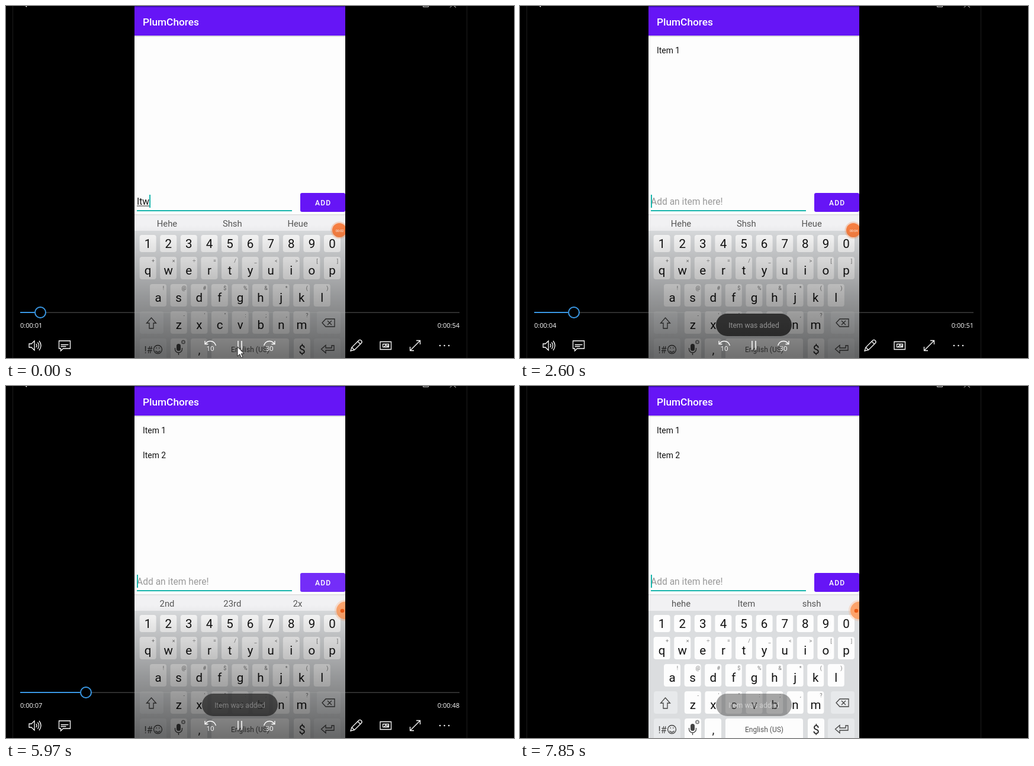
An HTML page with a canvas for the animation above (7.99 s loop, 858 by 595 pixels).

```html
<!DOCTYPE html>
<html lang="en">
<head>
<meta charset="utf-8">
<title>To-do demo</title>
<style>
html, body { margin: 0; height: 100%; overflow: hidden; background: #000; }
canvas { display: block; }
</style>
</head>
<body>
<canvas id="stage" width="858" height="595"></canvas>
<script>
const ctx = document.getElementById('stage').getContext('2d');
const LOOP = 7990, PITCH = 34.6;
const UI = 'Roboto, sans-serif', PLAYER = '"Open Sans", sans-serif';

// Steps: [start ms, value]
const typed = [[0, 'Itw'], [300, 'It'], [550, 'Ite'], [750, 'Item'], [1000, 'Item '], [1300, 'Item 1'], [1600, ''],
  [3550, 'I'], [3900, 'It'], [4150, 'Ite'], [4400, 'Item'], [4700, 'Item '], [4930, 'Item 2'], [5850, '']];
const hints = [[0, 'Hehe Shsh Heue'], [1050, 'U O K'], [1400, '1b 10r 11th'], [2150, 'Hehe Shsh Heue'],
  [4750, 'U O K'], [5200, '2nd 23rd 2x'], [6200, 'hehe Item shsh']];
const slider = [[0, 58], [1520, 76], [3680, 106], [5040, 124], [5970, 135], [6660, 143], [7990, 161]];

const at = (steps, t) => steps.filter(s => s[0] <= t).pop()[1];
const ramp = (t, a, b) => Math.min(1, Math.max(0, (t - a) / (b - a)));
function along(points, t) {
  const i = points.findIndex(p => p[0] > t), [a, x] = points[i - 1], [b, y] = points[i];
  return x + (y - x) * ramp(t, a, b);
}

function rect(x, y, w, h, color, r = 0) {
  ctx.fillStyle = color;
  ctx.beginPath();
  ctx.roundRect(x, y, w, h, r);
  ctx.fill();
}
function disc(x, y, r, color) {
  ctx.fillStyle = color;
  ctx.beginPath();
  ctx.arc(x, y, r, 0, 7);
  ctx.fill();
}
function text(s, x, y, size, color, align = 'center', weight = 400, family = UI) {
  ctx.font = `${weight} ${size}px ${family}`;
  ctx.textAlign = align;
  ctx.fillStyle = color;
  ctx.fillText(s, x, y);
}
function line(path, color, width = 1.3) {
  ctx.strokeStyle = color;
  ctx.lineWidth = width;
  ctx.stroke(new Path2D(path));
}
function faded(alpha, draw) {
  if (alpha <= 0) return;
  ctx.save();
  ctx.globalAlpha = alpha;
  draw();
  ctx.restore();
}

function keyRow(chars, x, y, h, base, symbols = '') {
  [...chars].forEach((c, i) => {
    const cx = x + PITCH * i;
    rect(cx - 14, y, 28, h, '#fdfdfd', 4);
    text(c, cx, base, 20.5, '#111');
    if (symbols) text(symbols[i], cx + 9, y + 10, 9, '#777');
  });
}

function keyboard() {
  rect(217, 380, 356, 215, '#dbdddf');
  keyRow('1234567890', 239.6, 387, 29, 409);
  keyRow('qwertyuiop', 239.6, 424, 38, 454, '+×÷=/_<>[]');
  keyRow('asdfghjkl', 257, 470, 38, 499.5, '!@#$%&*()');
  keyRow('zxcvbnm', 291.8, 516, 38, 545.5, '-\'":;,?');
  const fn = '#e7e9eb', ink = '#444';
  rect(226, 516, 40, 38, fn, 4);
  rect(525, 516, 40, 38, fn, 4);
  rect(226, 562, 45, 38, fn, 4);
  rect(520, 562, 45, 38, fn, 4);
  rect(278, 562, 28, 38, '#fdfdfd', 4);
  rect(312, 562, 28, 38, '#fdfdfd', 4);
  rect(347, 562, 131, 38, '#fdfdfd', 4);
  rect(486, 562, 28, 38, '#fdfdfd', 4);
  line('M245.5 527l8 9h-4.5v9h-7v-9h-4.500z', ink);
  line('M534 535.500l6-6.500h15v13h-15zM543 532l7 7m0-7l-7 7', ink);
  text('!#', 240.5, 587, 16, ink);
  line('M263.500 580.500a7 7 0 1 1-14 0a7 7 0 1 1 14 0M252.500 583q4 4.500 8 0M253.500 578h1.500m3 0h1.500', ink);
  rect(288, 571, 7, 12, ink, 3.5);
  line('M285.500 578v2a6 6 0 0 0 12 0v-2M291.500 586v4', ink);
  line('M302 568a2.500 2.500 0 1 1-5 0a2.500 2.500 0 1 1 5 0', '#888', 2);
  text(',', 326.5, 588, 20, '#222');
  text('English (US)', 412.5, 585, 12, '#555');
  text('$', 500, 588, 20, '#222');
  line('M554 574v8h-14v4.500l-7.500-6.500l7.500-6.500v4.500h10v-4z', ink);
}

function inputField(t) {
  const s = at(typed, t);
  text(s || 'Add an item here!', 221, 336, 15.6, s ? '#111' : '#999', 'left');
  const end = 221 + ctx.measureText(s).width;
  const start = 221 + ctx.measureText(s.slice(0, s.indexOf(' ') + 1)).width;
  if (s) rect(start, 337.5, end - start, 1, '#222');
  rect(221, 345, 262, 2, '#18b5ac');
  rect(s ? end : 221, 319, 2, 22, '#18b5ac');
  const pressed = [1600, 5850].some(p => t > p - 60 && t < p + 250);
  rect(497, 316, 76, 32, pressed ? '#742df8' : '#6615f6', 3);
  ctx.letterSpacing = '1.1px';
  text('ADD', 522, 337, 12.1, '#fff', 'left', 500);
  ctx.letterSpacing = '0px';
}

function recorder(t) {
  if (t < 4400) {
    disc(563, 379, 14.5, 'rgba(240,150,100,.35)');
    disc(563, 379, 12, '#f77f42');
    text('00:0' + Math.floor(2 + t / 1000), 563.5, 381.5, 5.5, '#fff');
  } else {
    disc(573, 379.5, 18, 'rgba(250,170,120,.3)');
    disc(573, 379.5, 15, '#fca36b');
    disc(568, 380, 3.3, '#ed5a14');
  }
}

function toast(t, start, out, end) {
  faded(ramp(t, start, start + 150) * (1 - ramp(t, out, end)), () => {
    rect(331, 520, 128, 38, '#505050', 19);
    text('Item was added', 395, 544, 12.1, '#fff');
  });
}

function phone(t) {
  ctx.save();
  ctx.beginPath();
  ctx.rect(217, 0, 356, 595);
  ctx.clip();
  rect(217, 0, 356, 595, '#fdfdfd');
  rect(217, 50, 356, 2, '#d8d8dc');
  rect(217, 0, 356, 50, '#6615f6');
  rect(217, 0, 356, 2, '#3f0bb4');
  text('PlumChores', 231, 32.5, 17.3, '#fff', 'left', 500);
  if (t >= 1600) text('Item 1', 231, 80, 13.9, '#111', 'left');
  if (t >= 5850) text('Item 2', 231, 121.5, 13.9, '#111', 'left');
  inputField(t);
  rect(217, 352, 356, 28, '#f1f1f3');
  rect(217, 352, 356, 1.5, '#dcdcde');
  at(hints, t).split(' ').forEach((w, i) => text(w, 272 + 110.3 * i, 372.5, 14.8, '#555'));
  keyboard();
  recorder(t);
  toast(t, 1650, 3200, 3600);
  toast(t, 5850, 7580, 8130);
  ctx.restore();
}

function skip(x, dir, label) {
  ctx.save();
  ctx.translate(x, 0);
  ctx.scale(dir, 1);
  line('M-9 566v5.500h5.500M-9 571.500Q-5 566.500 0 566.500Q7 566.500 9.500 574', '#fff');
  ctx.restore();
  text(label, x, 582.5, 11.5, '#fff', 'center', 400, PLAYER);
}

function controls(t) {
  const shade = ctx.createLinearGradient(0, 370, 0, 595);
  shade.addColorStop(0, 'rgba(0,0,0,0)');
  shade.addColorStop(.53, 'rgba(0,0,0,.31)');
  shade.addColorStop(1, 'rgba(0,0,0,.56)');
  rect(217, 370, 356, 225, shade);

  const x = along(slider, t);
  rect(x + 10, 517.5, 756 - x, 1.3, 'rgba(160,160,160,.45)');
  rect(24, 517, x - 34, 2, '#3a98e4');
  ctx.strokeStyle = '#3a98e4';
  ctx.lineWidth = 2;
  ctx.beginPath();
  ctx.arc(x, 518, 9, 0, 7);
  ctx.stroke();
  const sec = Math.floor((x - 24) / 13.4 - .7);
  text('0:00:0' + sec, 24, 543.5, 11, '#fff', 'left', 400, PLAYER);
  text('0:00:' + (55 - sec), 766, 543.5, 11, '#fff', 'right', 400, PLAYER);

  const hover = t > 600 && t < 2450;
  if (hover) rect(371, 557, 48, 38, 'rgba(255,255,255,.16)');
  const w = '#fff';
  line('M39 571h4l5-5v16l-5-5h-4zM51 571q2 3 0 6M53.500 568.500q4 5.500 0 11M56 566q6 8 0 16', w);
  line('M89.500 566h19v13h-12l-4 4v-4h-3zM92.500 572.500h13M92.500 575.500h9', w);
  skip(345, 1, '10');
  line('M392 566v15M398 566v15', w, 1.5);
  skip(445, -1, '30');
  line('M582 583l2-6l12-12q2-1.500 4 .500t.500 4l-12 12zM584 577l4.500 4.500M594 567l4.500 4.500', w);
  line('M632 567.500h18.500v13h-18.500z', w);
  line('M636.500 571.500h10v5h-10zM639 576l2.500-3l2 2l1.500-1l1 2', w);
  line('M682.500 582.500l17-17M693 565.500h6.500v6.500M682.500 576v6.500h6.500', w);
  for (const dx of [-7.5, 0, 7.5]) disc(740.5 + dx, 574, 1.2, w);
  line('M31 -3l4 4.500', w);

  if (t > 1000 && t < 2450) {
    rect(364, 525, 49, 30, '#4a4a4a', 3);
    rect(365, 526, 47, 28, '#2b2b2b', 2);
    text('Pause', 388.5, 544, 11.3, w, 'center', 400, PLAYER);
  }
}

function pointer() {
  const p = new Path2D('M391 576v16l3.800-3.500l2.600 6l2.500-1.100l-2.600-5.700h4.700z');
  ctx.fillStyle = '#fff';
  ctx.fill(p);
  ctx.strokeStyle = '#000';
  ctx.lineWidth = .8;
  ctx.stroke(p);
}

function frame() {
  const t = performance.now() % LOOP;
  rect(0, 0, 858, 595, '#000');
  rect(11, 0, 1, 595, '#1c1c1c');
  rect(778, 0, 1, 595, '#1c1c1c');
  line('M704.500 0v1.500h9v-1.500M750 2.500l4.500-4.500l5.500 4.500', '#ddd', 1);
  phone(t);
  faded(1 - ramp(t, 6450, 6900), () => controls(t));
  if (t < 2450) pointer();
  requestAnimationFrame(frame);
}
frame();
</script>
</body>
</html>
```
